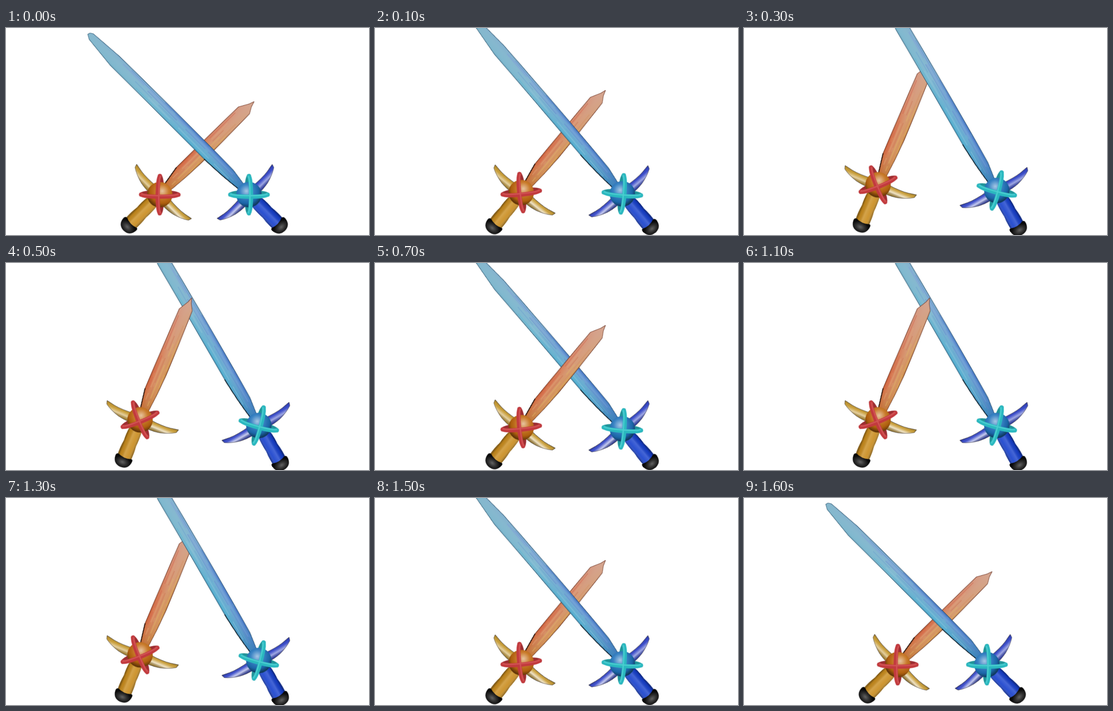
Animation, 700 px wide and 400 px high, one loop 3600 ms. Source, as an HTML page:

```html
<!DOCTYPE html>
<html lang="en">
<head>
<meta charset="utf-8">
<title>Crossing swords</title>
<style>
  html, body { margin: 0; width: 100%; height: 100%; overflow: hidden; background: #fff; }
  svg { position: absolute; left: 0; top: 0; width: 100%; height: 100%; }
  .sword { transform-origin: 0 0; animation: 3600ms step-end infinite; }

  .ice  { z-index: 1; --ball: #1f72bc; --ring: #2ab8bf; --shine: #62dcdc; --guard: #2c3fc4; --grip: #1740cc; }
  .fire { z-index: 0; --ball: #c26a10; --ring: #c23a3e; --shine: #dc6664; --guard: #c4962a; --grip: #c98c1e;
          animation: order 3600ms step-end infinite; }
  .ice .sword  { animation-name: ice; }
  .fire .sword { animation-name: fire; }

  /* five poses, one every 100 ms, swinging open and shut twice, then a rest */
  @keyframes ice {
    0%, 22.222%, 44.444%, 100%          { transform: translate(468.5px, 322px) rotate(-44.7deg); }
    2.777%, 19.444%, 25%, 41.666%       { transform: translate(477px, 320.5px) rotate(-40.2deg); }
    5.555%, 16.666%, 27.777%, 38.888%   { transform: translate(483px, 317.5px) rotate(-35.2deg); }
    8.333%, 13.888%, 30.555%, 36.111%   { transform: translate(487.5px, 314px) rotate(-29.8deg); }
    11.111%, 33.333%                    { transform: translate(490px, 311.5px) rotate(-24.4deg); }
  }
  @keyframes fire {
    0%, 22.222%, 44.444%, 100%          { transform: translate(296.5px, 322px) rotate(45deg); }
    2.777%, 19.444%, 25%, 41.666%       { transform: translate(282px, 318px) rotate(39.1deg); }
    5.555%, 16.666%, 27.777%, 38.888%   { transform: translate(270px, 311px) rotate(31deg); }
    8.333%, 13.888%, 30.555%, 36.111%   { transform: translate(258.5px, 303px) rotate(22.6deg); }
    11.111%, 33.333%                    { transform: translate(246px, 298px) rotate(13.5deg); }
  }
  @keyframes order {
    0%, 100% { z-index: 0; }
    13.888%  { z-index: 2; }
    36.111%  { z-index: 0; }
  }

  .ring  { fill: none; stroke: var(--ring); stroke-width: 8; stroke-linecap: round; }
  .shine { fill: none; stroke: var(--shine); stroke-width: 2.4; stroke-linecap: round; opacity: .6; }
  .ring .dim { stroke: #000; opacity: .2; }
  .streaks { fill: none; stroke-width: 1.6; opacity: .5; }
</style>
</head>
<body>

<svg class="fire" viewBox="0 0 700 400">
  <defs>
    <linearGradient id="fireAcross" gradientUnits="userSpaceOnUse" x1="-14" y1="0" x2="14" y2="0">
      <stop offset="0" stop-color="#c2502f"/>
      <stop offset=".15" stop-color="#da7350"/>
      <stop offset=".5" stop-color="#d6936c"/>
      <stop offset=".85" stop-color="#d69a5c"/>
      <stop offset="1" stop-color="#a8642c"/>
    </linearGradient>
    <linearGradient id="fireAlong" gradientUnits="userSpaceOnUse" x1="0" y1="-250" x2="0" y2="-20">
      <stop offset="0" stop-color="#d4a794" stop-opacity=".9"/>
      <stop offset=".4" stop-color="#d6a184" stop-opacity=".55"/>
      <stop offset=".75" stop-color="#d49058" stop-opacity=".15"/>
      <stop offset="1" stop-color="#b4601c" stop-opacity=".6"/>
    </linearGradient>
    <linearGradient id="iceAcross" gradientUnits="userSpaceOnUse" x1="-14" y1="0" x2="14" y2="0">
      <stop offset="0" stop-color="#2f8fb4"/>
      <stop offset=".15" stop-color="#5cb4d2"/>
      <stop offset=".5" stop-color="#72b2d2"/>
      <stop offset=".75" stop-color="#6c9ed4"/>
      <stop offset="1" stop-color="#3c68b4"/>
    </linearGradient>
    <linearGradient id="iceAlong" gradientUnits="userSpaceOnUse" x1="0" y1="-438" x2="0" y2="-25">
      <stop offset="0" stop-color="#8ab8cc" stop-opacity=".85"/>
      <stop offset=".45" stop-color="#8fbdd0" stop-opacity=".65"/>
      <stop offset=".75" stop-color="#62a4d0" stop-opacity=".15"/>
      <stop offset="1" stop-color="#2064ac" stop-opacity=".6"/>
    </linearGradient>
    <linearGradient id="guardLight" gradientUnits="userSpaceOnUse" x1="0" y1="-10" x2="0" y2="12">
      <stop offset="0" stop-color="#000" stop-opacity=".2"/>
      <stop offset=".3" stop-color="#fff" stop-opacity=".1"/>
      <stop offset=".6" stop-color="#fff" stop-opacity=".75"/>
      <stop offset="1" stop-color="#000" stop-opacity=".2"/>
    </linearGradient>
    <linearGradient id="gripLight" gradientUnits="userSpaceOnUse" x1="-14" y1="0" x2="15" y2="0">
      <stop offset="0" stop-color="#000" stop-opacity=".4"/>
      <stop offset=".25" stop-color="#fff" stop-opacity=".08"/>
      <stop offset=".55" stop-color="#fff" stop-opacity=".2"/>
      <stop offset=".8" stop-color="#000" stop-opacity=".05"/>
      <stop offset="1" stop-color="#000" stop-opacity=".5"/>
    </linearGradient>
    <radialGradient id="ballLight" cx=".4" cy=".36" r=".64">
      <stop offset="0" stop-color="#fff" stop-opacity=".6"/>
      <stop offset=".4" stop-color="#fff" stop-opacity=".12"/>
      <stop offset=".75" stop-color="#000" stop-opacity=".1"/>
      <stop offset="1" stop-color="#000" stop-opacity=".5"/>
    </radialGradient>
    <radialGradient id="capLight" cx=".5" cy=".55" r=".5">
      <stop offset="0" stop-color="#626262"/>
      <stop offset=".5" stop-color="#303030"/>
      <stop offset="1" stop-color="#080808"/>
    </radialGradient>

    <path id="wing" d="M18,-7.500 Q44,-5 60,-7.500 Q70,-9.500 76,-10.500 L74,-4 Q62,4 45,8.500 Q34,11 18,11 Z"/>
    <path id="grip" d="M-12,20 Q-13.500,40 -12.500,50 Q-14.500,64 -13.500,82 L14,82 Q15.500,62 13.500,48 Q15,36 13,20 Z"/>

    <g id="hilt">
      <use href="#grip" fill="var(--grip)"/>
      <use href="#grip" fill="url(#gripLight)"/>
      <path d="M-17,81 Q-17,76 -13,77 Q1,82 13,76 Q18,76 17.500,82 Q16,98 0,98.500 Q-16,98 -17,81 Z" fill="url(#capLight)"/>
      <g stroke-linejoin="round" stroke="#221c20" stroke-opacity=".5" stroke-width=".8">
        <g transform="translate(-3 .5)">
          <use href="#wing" fill="var(--guard)"/>
          <use href="#wing" fill="url(#guardLight)" opacity=".75"/>
        </g>
        <g transform="scale(-1 1)">
          <use href="#wing" fill="var(--guard)"/>
          <use href="#wing" fill="url(#guardLight)"/>
        </g>
      </g>
      <g transform="rotate(44.800)">
        <g class="ring">
          <path d="M-36,0 A36,4.500 0 0 1 36,0"/>
          <path d="M0,-36 A4.500,36 0 0 0 0,36"/>
          <path class="dim" d="M-36,0 A36,4.500 0 0 1 36,0"/>
          <path class="dim" d="M0,-36 A4.500,36 0 0 0 0,36"/>
        </g>
        <circle r="24.500" fill="var(--ball)"/>
        <circle r="24.500" fill="url(#ballLight)"/>
        <g class="ring">
          <path d="M-36,0 A36,4 0 0 0 36,0"/>
          <path d="M0,-36 A4,36 0 0 1 0,36"/>
        </g>
        <g class="shine">
          <path d="M-35,-1 A36,4 0 0 0 35,-1"/>
          <path d="M-1,-35 A4,36 0 0 1 -1,35"/>
        </g>
      </g>
    </g>

    <path id="fireBlade" d="M-8,-20 L-14.500,-60 Q-14,-150 -12.700,-227 L-2,-246 L1.500,-256 L5,-245 L12,-233 Q13.500,-160 13.500,-100 Q12.500,-60 8.500,-20 Z"/>
    <path id="iceBlade" d="M-6.500,-20 Q-11.500,-60 -13,-100 L-13.500,-250 L-14.300,-366 L-8,-430 L-3,-439 L2,-437.500 L5.300,-432 L10.500,-366 Q12.500,-250 12.500,-120 L12,-55 L7,-20 Z"/>
  </defs>

  <g class="sword">
    <use href="#fireBlade" fill="url(#fireAcross)"/>
    <use href="#fireBlade" fill="url(#fireAlong)" stroke="#5a2416" stroke-width=".8"/>
    <g class="streaks">
      <path d="M-9,-215 V-60" stroke="#d2604a" stroke-dasharray="70 14 36 9"/>
      <path d="M-5,-190 V-40" stroke="#e2a880" stroke-dasharray="44 20 60 12"/>
      <path d="M-1,-175 V-34" stroke="#cc7450" stroke-dasharray="30 16 52 8"/>
      <path d="M3,-160 V-30" stroke="#e2b868" stroke-dasharray="26 18 70 6"/>
      <path d="M7,-200 V-40" stroke="#d48c64" stroke-dasharray="48 12 30 16"/>
      <path d="M10.500,-170 V-70" stroke="#e0b458" stroke-dasharray="64 8"/>
    </g>
    <path d="M-14.500,-60 L-8,-22" fill="none" stroke="#1c0c06" stroke-width="1.6"/>
    <use href="#hilt" transform="scale(-1 1)"/>
  </g>
</svg>

<svg class="ice" viewBox="0 0 700 400">
  <g class="sword">
    <use href="#iceBlade" fill="url(#iceAcross)"/>
    <use href="#iceBlade" fill="url(#iceAlong)" stroke="#1c4560" stroke-width=".8"/>
    <g class="streaks">
      <path d="M-10,-300 V-85" stroke="#58b8d4" stroke-dasharray="90 16 50 10"/>
      <path d="M-6,-270 V-50" stroke="#94c8de" stroke-dasharray="60 22 84 14"/>
      <path d="M-2,-310 V-40" stroke="#6a9ed0" stroke-dasharray="46 18 70 9"/>
      <path d="M2,-280 V-36" stroke="#6880d0" stroke-dasharray="80 24 54 8"/>
      <path d="M5,-350 V-50" stroke="#8298dc" stroke-dasharray="58 14 96 12"/>
      <path d="M8,-330 V-46" stroke="#6488d8" stroke-dasharray="110 10 40 14"/>
      <path d="M10.500,-240 V-66" stroke="#4068cc" stroke-dasharray="120 6"/>
    </g>
    <path d="M-13,-110 Q-11.500,-60 -6.500,-22" fill="none" stroke="#06121c" stroke-width="1.4"/>
    <use href="#hilt"/>
  </g>
</svg>

</body>
</html>
```
